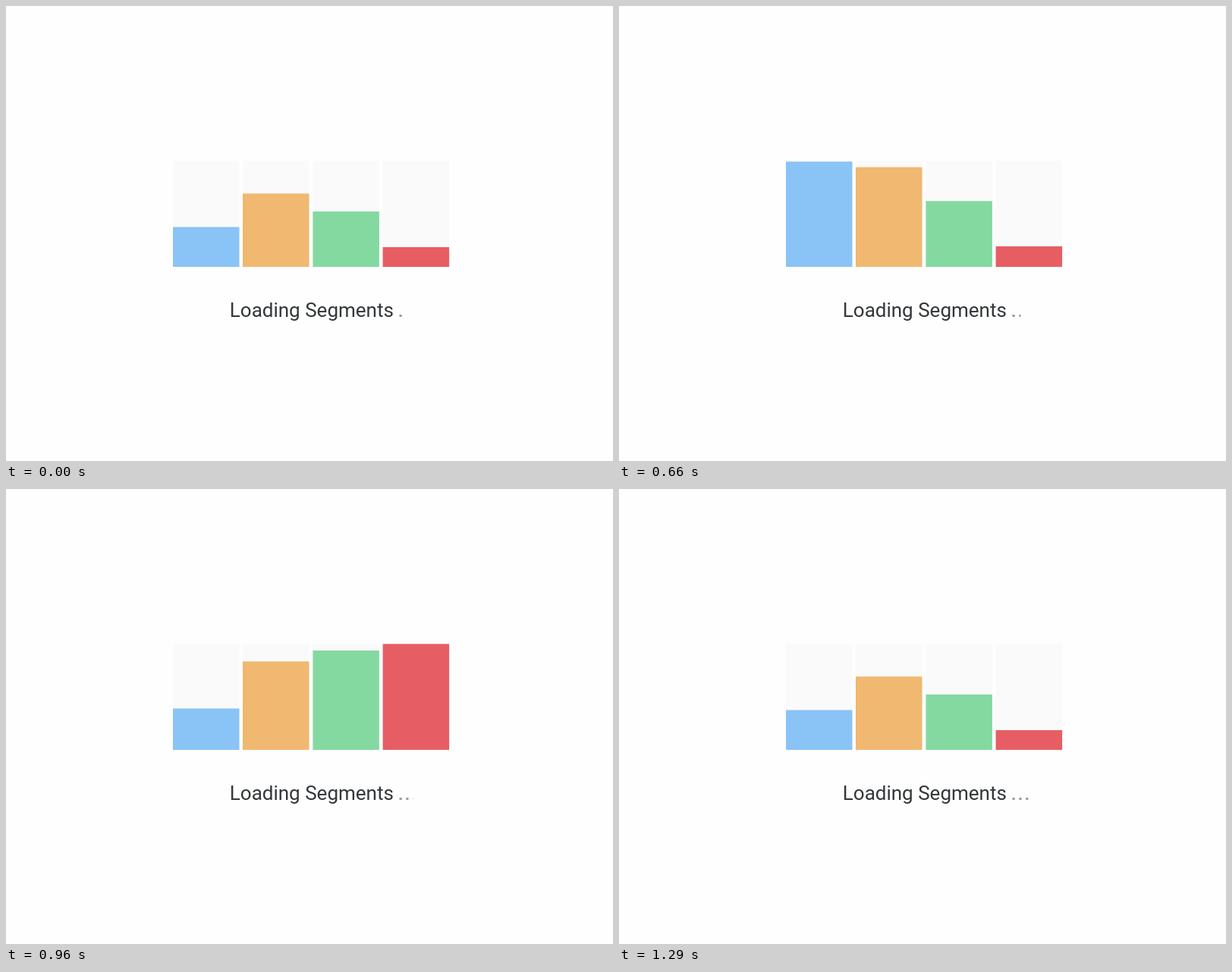
An HTML page with a canvas that plays this animation: 800 by 600 pixels, repeating every 1.65 s.

```html
<!DOCTYPE html>
<html lang="en">
<head>
<meta charset="utf-8">
<title>Loading Segments</title>
<style>
  html, body { margin: 0; width: 100%; height: 100%; overflow: hidden; background: #fefefe; }
  canvas { display: block; }
</style>
</head>
<body>
<canvas id="stage" width="800" height="600"></canvas>
<script>
const ctx = document.getElementById('stage').getContext('2d');
const LOOP = 1650, STEP = 30;
const TOP = 204.3, BASE = 344, BAR_W = 87.5;
const RISE = 330, FALL = 300;

// rest: resting top edge; up and down: start times of the two moves
const bars = [
  { x: 220,   color: '#8ac3f5', rest: 291.5, up: 367, down: 690 },
  { x: 312,   color: '#f0b870', rest: 247.3, up: 453, down: 782 },
  { x: 404.4, color: '#84d9a1', rest: 271,   up: 538, down: 862 },
  { x: 496.6, color: '#e65e64', rest: 318,   up: 625, down: 961 }
];

const clamp = v => Math.max(0, Math.min(1, v));

// Bezier ease with handles (a, 0) and (b, 1)
function bezier(a, b) {
  return v => {
    const x = clamp(v);
    let lo = 0, hi = 1;
    for (let i = 0; i < 24; i++) {
      const s = (lo + hi) / 2, r = 1 - s;
      if (3 * a * s * r * r + 3 * b * s * s * r + s * s * s < x) lo = s;
      else hi = s;
    }
    const s = (lo + hi) / 2;
    return s * s * (3 - 2 * s);
  };
}

const riseEase = bezier(0.65, 0.33);
const fallEase = bezier(0.6, 0.6);

function drawBar(bar, t) {
  const rise = riseEase((t - bar.up) / RISE);
  const fall = fallEase((t - bar.down) / FALL);
  const y = bar.rest + (TOP - bar.rest) * Math.min(rise, 1 - fall);
  ctx.fillStyle = '#fafafa';
  ctx.fillRect(bar.x, TOP, BAR_W, BASE - TOP);
  ctx.fillStyle = bar.color;
  ctx.fillRect(bar.x, y, BAR_W, BASE - y);
}

// Dots are uncovered by an edge that slides right
function drawDots(t) {
  const edge = Math.max(524, 538.5 + (t - 1050) * 0.0233);
  ctx.fillStyle = '#999c9e';
  for (const x of [518.5, 527.3, 536.2]) {
    const w = Math.min(3.2, edge - x);
    if (w > 0) ctx.fillRect(x, 407, w, 3);
  }
}

function draw(now) {
  const t = Math.floor((now % LOOP) / STEP) * STEP;
  ctx.fillStyle = '#fefefe';
  ctx.fillRect(0, 0, 800, 600);
  bars.forEach(bar => drawBar(bar, t));
  ctx.fillStyle = '#333739';
  ctx.font = '26px Roboto, sans-serif';
  ctx.fillText('Loading Segments', 294.8, 410);
  drawDots(t);
}

let start = null;
function tick(now) {
  if (start === null) start = now;
  draw(now - start);
  requestAnimationFrame(tick);
}
draw(0);
requestAnimationFrame(tick);
</script>
</body>
</html>
```
